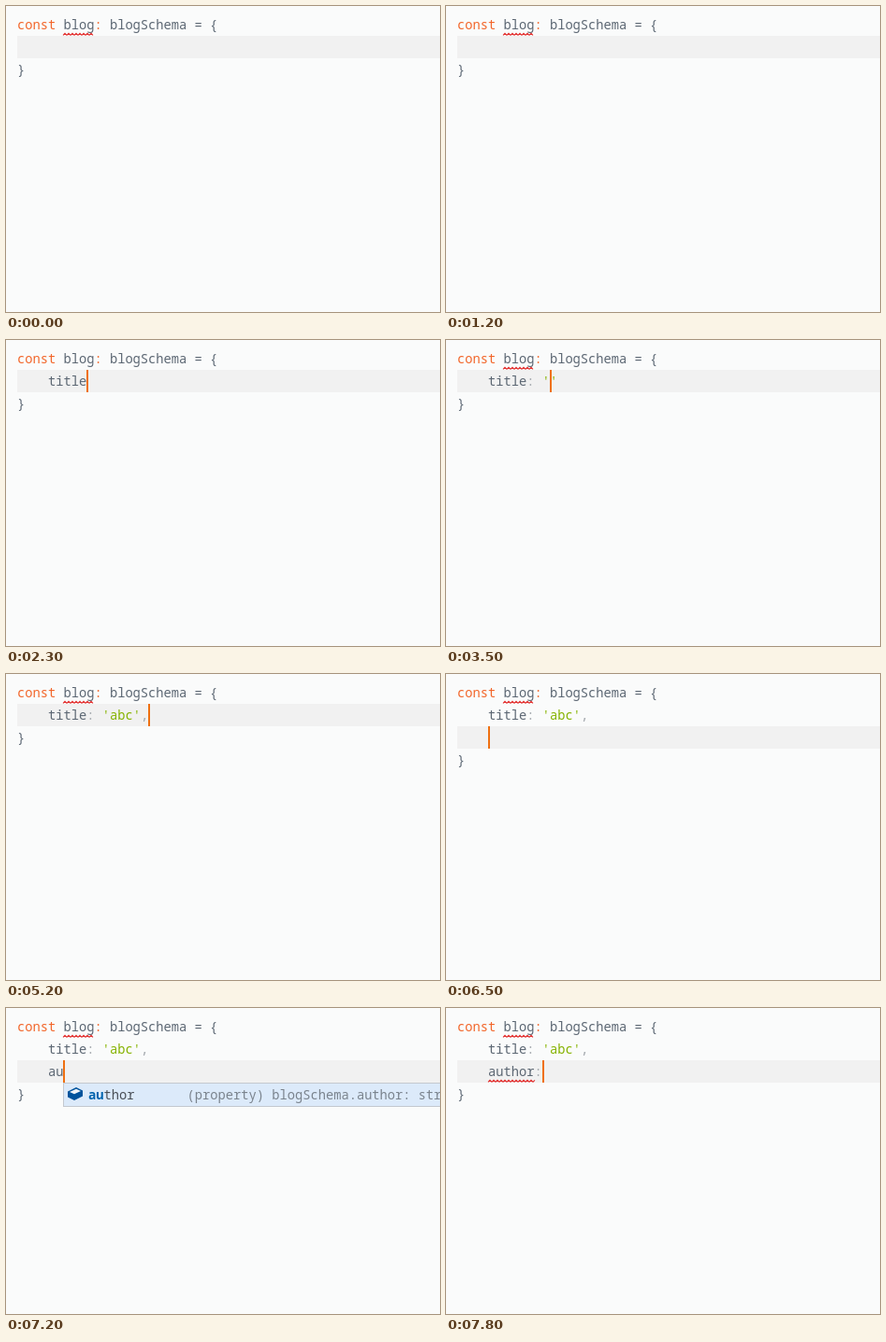
An HTML page for the animation above (8 s loop, 464 by 328 pixels).

```html
<!DOCTYPE html>
<html lang="en">
<head>
<meta charset="utf-8">
<title>Typing with suggestions</title>
<style>
  html, body { margin: 0; width: 100%; height: 100%; overflow: hidden; background: #fafbfb; }
  svg { display: block; }
  text { font: 13.745px "Noto Sans Mono", "DejaVu Sans Mono", monospace; white-space: pre; fill: #5c6773; }
  .key { fill: #f2662a; }
  .str { fill: #86b300; }
  .dim { fill: #a3a8ad; }
  .item { fill: #4a4f57; }
  .hit { fill: #0062ad; font-weight: 700; }
  .detail { fill: #7a838d; }
  .doc { font: 14px "Open Sans", "Noto Sans", sans-serif; fill: #717880; }
</style>
</head>
<body>
<svg id="stage" width="464" height="328" viewBox="0 0 464 328"></svg>
<script>
const LOOP = 8000, LEFT = 12, TOP = 8, LINE = 24, CHAR = 8.247;
const stage = document.getElementById('stage');
const colX = col => Math.round(LEFT + col * CHAR);
const rowY = row => TOP + row * LINE;

// Suggestion rows: name, indexes of matched letters, kind, detail
const field = (name, hits) => ({ name, hits, kind: 'field', detail: `(property) blogSchema.${name}: string` });
const snippet = (name, hits) => ({ name, hits, kind: 'snippet', detail: 'vue-snippets' });

const lists = {
  t: { col: 5, pick: 0, items: [field('title', [0]), field('author', [2]), field('date', [2]), field('meta', [2]),
       snippet('template', [0]), snippet('text', [0]), snippet('transition', [0]), snippet('try', [0])] },
  ti: { col: 6, pick: 0, items: [field('title', [0, 1])] },
  a: { col: 5, pick: 5, doc: 'just a word', items: [field('author', [0]), field('date', [1]), field('meta', [3]),
       snippet('actions', [0]), snippet('activated', [0]), snippet('alias', [0])] },
  au: { col: 6, pick: 0, items: [field('author', [0, 1])] }
};

// Steps: time, row, typed text, caret column (0 = hidden), underlines (b = blog, w = word), list
const steps = [
  [0, 1, '', 0, 'b'],
  [700, 1, '', 4, 'b'],
  [1200, 1, '', 0, 'b'],
  [1600, 1, 't', 5, 'b', 't'],
  [1700, 1, 'ti', 6, 'b', 'ti'],
  [2100, 1, 'ti', 6, 'w', 'ti'],
  [2300, 1, 'title', 9, ''],
  [2600, 1, 'title', 9, 'bw'],
  [2700, 1, 'title', 0, 'bw'],
  [2900, 1, 'title:', 10, 'bw'],
  [3000, 1, 'title: ', 11, 'bw'],
  [3200, 1, "title: ''", 12, 'bw'],
  [3500, 1, "title: ''", 12, 'b'],
  [3700, 1, "title: 'a'", 13, 'b'],
  [3900, 1, "title: 'ab'", 14, 'b'],
  [4400, 1, "title: 'ab'", 0, 'b'],
  [4500, 1, "title: 'a'", 13, 'b'],
  [4600, 1, "title: 'ab'", 14, 'b'],
  [4800, 1, "title: 'abc'", 15, 'b'],
  [5000, 1, "title: 'abc'", 16, 'b'],
  [5200, 1, "title: 'abc',", 17, 'b'],
  [5600, 2, '', 4, 'b'],
  [6000, 2, '', 0, 'b'],
  [6500, 2, '', 4, 'b'],
  [6900, 2, 'a', 5, 'b', 'a'],
  [7100, 2, 'au', 6, 'b', 'au'],
  [7500, 2, 'author', 10, ''],
  [7800, 2, 'author:', 11, 'bw']
];

const rect = (x, y, w, h, fill, more = '') =>
  `<rect x="${x}" y="${y}" width="${w}" height="${h}" fill="${fill}" ${more}/>`;
const label = (x, y, body, cls = '') => `<text x="${x}" y="${y}" class="${cls}">${body}</text>`;
const span = (cls, body) => `<tspan class="${cls}">${body}</tspan>`;
const codeLine = (row, col, body) => label(LEFT + col * CHAR, rowY(row) + 17, body);

function paint(text) {
  return text.replace(/'[^']*'|[:,]/g, part => span(part[0] === "'" ? 'str' : 'dim', part));
}

function squiggle(row, col, count) {
  const x = colX(col), y = rowY(row) + 21.3;
  const n = Math.round(count * CHAR / 2);
  let d = '';
  for (let i = 0; i <= n; i++) d += `${i ? 'L' : 'M'}${x + i * 2} ${y + (i % 2 ? 0 : 2)}`;
  return `<path d="${d}" fill="none" stroke="#e3302f" stroke-width="1.1"/>`;
}

function icon(kind, x, y) {
  if (kind === 'field') {
    return `<g transform="translate(${x} ${y})">
      <path d="M0 4.5L9 0L16 3.5V9.5L7 14L0 10.5Z" fill="#00539c"/>
      <path d="M2 5L9 1.8L14 4L7 7.3Z" fill="#f0f4f8"/></g>`;
  }
  return `<g transform="translate(${x + 1} ${y - 1})" fill="none" stroke="#424242">
    <path d="M1 12V1H14V12" stroke-width="1.6"/>
    <path d="M0 15H16" stroke-width="2" stroke-dasharray="2 2"/></g>`;
}

function suggestions({ col, pick, items, doc }, row) {
  const x = colX(col), y = rowY(row + 1);
  const rows = items.length + (doc ? 1 : 0);
  const right = x + 429.5;
  let out = rect(x + .5, y + .5, 429, rows * LINE + 1, '#f3f3f3', 'stroke="#c3c8cf"');
  out += rect(x + 1, y + 1 + pick * LINE, 428, LINE * (doc ? 2 : 1), '#dceafa');
  items.forEach((item, i) => {
    const top = y + 1 + i * LINE;
    const name = [...item.name].map((c, k) => item.hits.includes(k) ? span('hit', c) : c).join('');
    out += icon(item.kind, x + 5, top + 4) + label(x + 27, top + 17, name, 'item');
    if (i === pick) out += label(right - item.detail.length * CHAR, top + 17, item.detail, 'detail');
  });
  if (doc) {
    const top = y + 1 + (pick + 1) * LINE;
    out += label(x + 27, top + 18, doc, 'doc');
    out += `<circle cx="${x + 417}" cy="${top + 12}" r="7" fill="none" stroke="#8a95a3"/>`;
  }
  return out;
}

function draw([, row, typed, caret, marks, list]) {
  let out = rect(0, 0, 464, 328, '#fafbfb') + rect(LEFT, rowY(row), 452, LINE, '#f1f1f1');
  out += codeLine(0, 0, `${span('key', 'const')} blog${span('key', ':')} blogSchema = {`);
  if (row === 2) out += codeLine(1, 4, paint("title: 'abc',"));
  out += codeLine(row, 4, paint(typed)) + codeLine(row + 1, 0, '}');
  if (marks.includes('b')) out += squiggle(0, 6, 4);
  if (marks.includes('w')) out += squiggle(row, 4, typed.match(/^\w*/)[0].length);
  if (list) out += suggestions(lists[list], row);
  if (caret) out += rect(colX(caret), rowY(row), 2, LINE, '#ef7011');
  stage.innerHTML = out;
}

let shown;
function tick() {
  const time = performance.now() % LOOP;
  const step = steps.findLast(s => s[0] <= time);
  if (step !== shown) draw(shown = step);
  requestAnimationFrame(tick);
}
tick();
</script>
</body>
</html>
```
